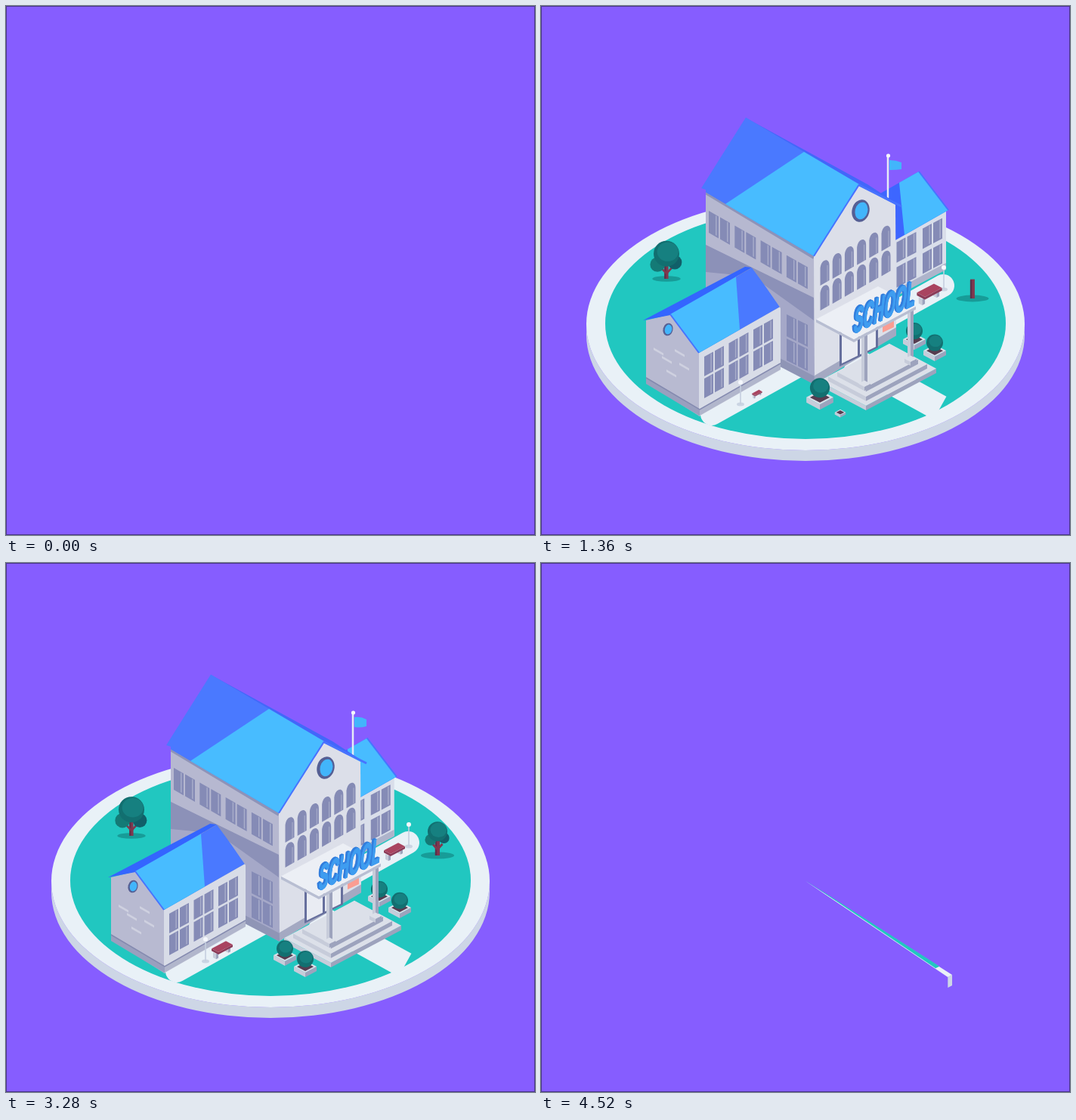
These frames come from a looping animation (700x700 px, 4.56 s). An HTML page with a canvas:

```html
<!DOCTYPE html>
<html lang="en">
<meta charset="utf-8">
<title>Isometric school</title>
<style>
html, body { margin: 0; height: 100%; overflow: hidden; background: #865dff; }
canvas { display: block; width: 100vw; height: 100vh; }
</style>
<canvas id="c" width="700" height="700"></canvas>
<script>
const g = document.getElementById('c').getContext('2d');
const LOOP = 4560, RAD = Math.PI / 180, M = .53, AXIS = .57;
const LIGHT = '#48bcff', BLUE = '#4a79ff', DEEP = '#3d66ff', EDGE = '#4774ff';
const STONE = ['#dce0e9', '#c7ccda', '#9da3bd'];
let t = 0;

// Timing
const clamp = v => Math.min(1, Math.max(0, v));
const ramp = (a, b) => {
  const s = clamp((t - a) / (b - a));
  return s * s * (3 - 2 * s);
};
const show = (a, b, c, d) => ramp(a, b) * (1 - ramp(c, d));
// Springs in at a, shrinks away from b
function pop(a, b) {
  const s = clamp((t - a) / 400) - 1;
  return (1 + 3.5 * s ** 3 + 2.5 * s * s) * (1 - ramp(b, b + 350));
}

// Drawing
function trace(p) {
  g.beginPath();
  for (let i = 0; i < p.length; i += 2) g.lineTo(p[i], p[i + 1]);
}
function poly(color, ...p) {
  trace(p);
  g.fillStyle = color;
  g.fill();
}
function line(color, width, ...p) {
  trace(p);
  g.strokeStyle = color;
  g.lineWidth = width;
  g.stroke();
}
function oval(color, x, y, rx, ry = rx, turn = 0) {
  g.beginPath();
  g.ellipse(x, y, rx, ry, turn, 0, 7);
  g.fillStyle = color;
  g.fill();
}
function group(draw) {
  g.save();
  draw();
  g.restore();
}
function scaled(x, y, k, draw) {
  if (k < .005) return;
  group(() => {
    g.translate(x, y);
    g.scale(k, k);
    g.translate(-x, -y);
    draw();
  });
}

// Upright panel whose top and bottom edges have slope m
function slab(color, x, y, w, h, m) {
  poly(color, x, y, x + w, y + w * m, x + w, y + w * m + h, x, y + h);
}
// Block seen from its front corner, a to the left, b to the right
function box(x, y, a, b, h, [top, left, right]) {
  slab(left, x - a, y - a * M, a, h, M);
  slab(right, x, y, b, h, -M);
  poly(top, x, y, x - a, y - a * M, x - a + b, y - (a + b) * M, x + b, y - b * M);
}
// Roof slope swept along its ridge; the lit part ends at ridge and eave lengths
function roof(color, ax, ay, ex, ey, len, m, ridge, eave) {
  const strip = (c, r, e) =>
    poly(c, ax, ay, ex, ey, ex + e, ey + e * m, ax + r, ay + r * m);
  strip(color, len, len);
  strip(LIGHT, ridge, eave);
  line(EDGE, 2, ax, ay, ex, ey);
}
function windows(x, y, step, count, rows, rise, m, w, h) {
  for (let i = 0; i < count; i++)
    for (let r = 0; r < rows; r++)
      for (const dx of [0, w + 2]) {
        const wx = x + i * step + dx, wy = y + r * rise + (wx - x) * m;
        slab('#858bb6', wx, wy, w, h, m);
        slab('#a9aecb', wx + w * .7, wy + w * .7 * m + 1, 1.4, h - 3, m);
      }
}
function porthole(x, y, r) {
  oval('#555f94', x, y, r, r * 1.3, .25);
  oval('#42b5fb', x + r * .08, y, r * .72, r, .25);
}

function ground() {
  const from = 48 - 138 * show(150, 1170, 3680, 4480);
  const to = 48 + 222 * show(0, 620, 3950, 4550);
  if (to - from < .1) return;
  const arc = (y, rx, ry, a, b, back) =>
    g.ellipse(350, y, rx, ry, 0, a * RAD, b * RAD, back);
  const slice = (color, y, rx, ry) => {
    g.beginPath();
    if (to - from < 359.9) g.moveTo(350, y);
    arc(y, rx, ry, from, to);
    g.fillStyle = color;
    g.fill();
  };
  if (t < 1170 && from < 30) {
    const rim = a => [350 + 290 * Math.cos(a * RAD), 421 + 167 * Math.sin(a * RAD)];
    poly('#17aba1', 350, 421, ...rim(Math.max(-90, from - 18)), ...rim(from));
  }
  const lo = Math.max(from, 0), hi = Math.min(to, 180);
  g.beginPath();
  arc(421, 290, 167, lo, hi);
  arc(435, 290, 167, hi, lo, true);
  g.fillStyle = '#cdd6e6';
  g.fill();
  slice('#e9f1f7', 421, 290, 167);
  slice('#21c7c0', 420, 265, 153);
}

function paths() {
  const p = show(300, 800, 3600, 4150);
  if (p < .01) return;
  const mix = (a, b) => a + (b - a) * p;
  g.lineCap = 'round';
  line('#e9f1f7', 30 * p * p, mix(380, 226), mix(453, 540), mix(380, 532), mix(453, 370));
  g.lineCap = 'butt';
  line('#e9f1f7', 35 * p * p, mix(408, 528), mix(466, 532), 408, 466);
}

function rightWing() {
  const p = show(450, 950, 3090, 3640);
  if (p < .01) return;
  group(() => {
    g.translate(-80 * (1 - p), 80 * AXIS * (1 - p));
    poly('#d9deea', 440, 320, 500, 224, 536, 272, 536, 348, 440, 400);
    slab('#aeb4cb', 440, 391, 96, 9, -M);
    windows(436, 331, 34.5, 3, 2, 33, -M, 12, 27);
    roof(DEEP, 500, 219, 539, 270, -100, -AXIS, -26, -58);
  });
}

function flag() {
  const p = show(1000, 1280, 3660, 4060);
  if (p < .01) return;
  const wave = Math.sin(t / 180) * .8;
  group(() => {
    g.translate(0, 55 * (1 - p));
    line('#e6ebf5', 2.5, 459, 199, 459, 254);
    oval('#f4f6fb', 459.5, 198, 2.6);
    g.beginPath();
    g.moveTo(461, 204);
    g.quadraticCurveTo(469, 203 + wave, 477, 207);
    g.lineTo(477, 216);
    g.quadraticCurveTo(469, 218 - wave, 461, 217);
    g.fillStyle = '#42b5fb';
    g.fill();
  });
}

function arch(x, y) {
  g.beginPath();
  g.moveTo(x - 6, y + 18);
  g.lineTo(x - 6, y - 5);
  g.bezierCurveTo(x - 5, y - 17, x + 6, y - 20, x + 6, y - 9);
  g.lineTo(x + 6, y + 11);
  g.fillStyle = '#858bb5';
  g.fill();
  line('#a5aac8', 1.2, x + 3.5, y - 9, x + 3.5, y + 12);
}

function hall() {
  // Side wall
  slab('#b6b8d0', 218, 243, 144, 176, AXIS);
  slab('#a5a8c8', 218, 316, 144, 105, .5);
  poly('#8c91b8', 218, 316, 361, 386, 361, 416, 280, 358, 218, 352);
  slab('#8f95b6', 218, 415, 144, 11, .52);
  line('#8e93b8', 4, 216, 246, 361, 333);
  windows(222, 271, 34.3, 4, 1, 0, AXIS, 13, 29);
  windows(325, 408, 0, 1, 2, 32, .5, 13, 29);

  // Front wall
  poly('#dcdfe9', 361, 331, 421, 238, 469, 263, 470, 435, 362, 500);
  slab('#a4a9c2', 362, 489, 108, 11, -.59);
  for (let i = 0; i < 12; i++)
    arch(375.5 + i % 6 * 16.2, (i < 6 ? 352 : 385) - i % 6 * 9.1);
  porthole(423, 271, 11.5);
  slab('#666f9d', 395, 419, 51, 58, -.49);
  for (const x of [398, 422]) slab('#e9ecf3', x, 420 - (x - 398) * .49, 21, 53, -.49);
  for (let i = 0; i < 3; i++) slab(i % 2 ? '#f3f4f8' : '#fa9d92', 452, 400 + i * 10.5, 15, 11, -.47);

  poly('#4267fa', 271, 148, 432, 236, 478, 266, 421, 237);
  roof(BLUE, 421, 236, 361, 331, -150, .59, -73, -117);
  line(EDGE, 3, 421, 237, 477, 265);
}

function leftWing() {
  const p = show(450, 960, 3350, 3850);
  if (p < .01) return;
  group(() => {
    trace([0, 345, 279, 345, 317, 400, 317, 700, 0, 700]);
    g.clip();
    g.translate(180 * (1 - p), -180 * (1 - p) * AXIS);
    poly('#b8bad1', 139, 416, 172, 408, 209, 459, 210, 543, 139, 498);
    slab('#d8dce7', 209, 459, 108, 84, -AXIS);
    slab('#9a9fbe', 139, 491, 71, 9, .6);
    slab('#b1b6cc', 210, 533, 107, 9, -AXIS);
    line('#858bb0', 1.5, 139, 492, 210, 534, 317, 473);
    windows(216, 464, 32.5, 3, 2, 29, -.55, 12, 26);
    for (let i = 0; i < 5; i++)
      slab('#cfd1e0', 149 + i * 17 % 40, 452 + i * 29 % 38, 13, 3, AXIS);
    porthole(168, 428, 6.5);
    poly('#3465ff', 135, 416, 270, 345, 279, 346, 171, 409);
    roof(BLUE, 171, 408, 209, 459, 108, -AXIS, 87, 54);
  });
}

function school() {
  const back = 144 * (1 - show(250, 820, 3800, 4214));
  const move = () => g.translate(-back, -back * .58);
  scaled(214, 242, show(40, 520, 4050, 4500), () => {
    group(() => { move(); flag(); });
    group(() => {
      trace([271, 145, 700, 145, 700, 700, 218, 700, 218, 243, 212, 241]);
      g.clip();
      move();
      hall();
    });
    group(() => { move(); leftWing(); });
  });
}

function steps() {
  const settle = show(850, 1100, 3600, 3850);
  const k = show(300, 550, 4000, 4300) * (1.17 - .17 * settle);
  const h = 2 + 4 * settle;
  scaled(411, 440, k, () => {
    for (let i = 0; i < 3; i++)
      box(430, 535 - h - i * (h + 12 * M), 62 - 12 * i, 93 - 12 * i, h, STONE);
  });
}

function pillar(x, top, base) {
  box(x, top, 4, 4, base - top, STONE);
  box(x, base - 1, 8, 8, 5, STONE);
}

function porch() {
  const p = show(950, 1250, 3450, 3800);
  if (p < .01) return;
  group(() => {
    g.globalAlpha = Math.min(1, p * 4);
    pillar(489, 473 - 70 * p, 472);
    pillar(428, 505 - 72 * p, 505);
    scaled(416, 392, p, () => box(414, 441, 50, 82, 4, ['#eceff5', '#b8bed2', '#b8bed2']));
  });
}

function sign() {
  const p = show(1100, 1500, 3150, 3500);
  if (p < .01) return;
  group(() => {
    g.translate(413, 434);
    g.transform(.44, -.21, -.12, p + 2 * p * (1 - p), 0, 0);
    g.font = 'bold 43px "Liberation Sans", Arial, sans-serif';
    g.lineWidth = 1.5;
    const print = (color, d) => {
      g.fillStyle = g.strokeStyle = color;
      g.fillText('SCHOOL', -d, -d * .35);
      g.strokeText('SCHOOL', -d, -d * .35);
    };
    for (let d = 4 + 8 * (1 - p); d > 0; d--) print('#347fdd', d);
    print('#3f9df0', 0);
  });
}

function lamp(x, y, k) {
  scaled(x, y, k, () => {
    oval('#cbd5e3', x, y, 5, 2.5);
    line('#c5cfdf', 1.6, x, y, x, y - 28);
    oval('#f5f7fc', x, y - 29, 3);
  });
}

function bench(x, y, k) {
  scaled(x, y + 6, k, () => {
    for (const dx of [8, -8]) box(x + dx, y + 4 - dx * M, 4, 3, 7, STONE);
    box(x - 5, y + 6, 9, 19, 3, ['#a94460', '#8b3b58', '#8b3b58']);
  });
}

function planter(x, y, size, bush) {
  scaled(x, y + 5, size, () => {
    box(x, y + 6, 15, 15, 6, STONE);
    box(x, y + 4, 11, 11, 0, ['#563d50', '', '']);
  });
  const top = y - 12 + Math.sin(t / 210 + x) * 1.3;
  scaled(x, y, bush, () => {
    oval('#126f70', x, top, 11);
    oval('#168080', x + 1, top - 2, 8.5, 7.5);
  });
}

function tree(x, y, size, k) {
  const sway = Math.sin(t / 230 + x), leaf = clamp((k * 4 - 1) / 3);
  scaled(x, y, size * clamp(k * 4), () => {
    oval('#179c98', x, y, 22, 4.5);
    line('#81384e', 6, x, y, x, y - 26);
    line('#5c304a', 2.5, x - 2, y, x - 2, y - 25);
    for (const side of [-1, 1]) line('#81384e', 3, x, y - 8, x + side * 10 * leaf, y - 8 - 11 * leaf);
    scaled(x, y - 18, leaf, () => {
      oval('#147a76', x - 14, y - 23 + sway, 11.5);
      oval('#115f69', x + 13, y - 25 - sway, 11);
      oval('#126f70', x, y - 40 + sway, 20);
      oval('#168080', x + 2, y - 43 + sway, 16.5, 15);
    });
  });
}

function draw() {
  g.fillStyle = '#865dff';
  g.fillRect(0, 0, 700, 700);
  ground();
  paths();
  rightWing();
  school();
  tree(166, 361, .85, show(900, 1370, 3350, 3800));
  tree(571, 387, 1, show(1200, 1700, 3110, 3620));
  lamp(533, 375, pop(400, 4000));
  bench(514, 379, pop(1140, 3400));
  steps();
  planter(494, 443, pop(500, 3900), pop(900, 3620));
  porch();
  sign();
  planter(521, 458, pop(900, 3400), pop(950, 3350));
  lamp(264, 527, pop(900, 3580));
  bench(286, 509, pop(1320, 3400));
  planter(369, 521, pop(1140, 3400), pop(1160, 3350));
  planter(396, 536, pop(1320, 3400), pop(1380, 3350));
  g.strokeStyle = '#49348c';
  g.lineWidth = 1;
  g.strokeRect(.5, .5, 699, 699);
}

const start = performance.now();
function frame() {
  t = (performance.now() - start) % LOOP;
  draw();
  requestAnimationFrame(frame);
}
frame();
</script>
</html>
```
